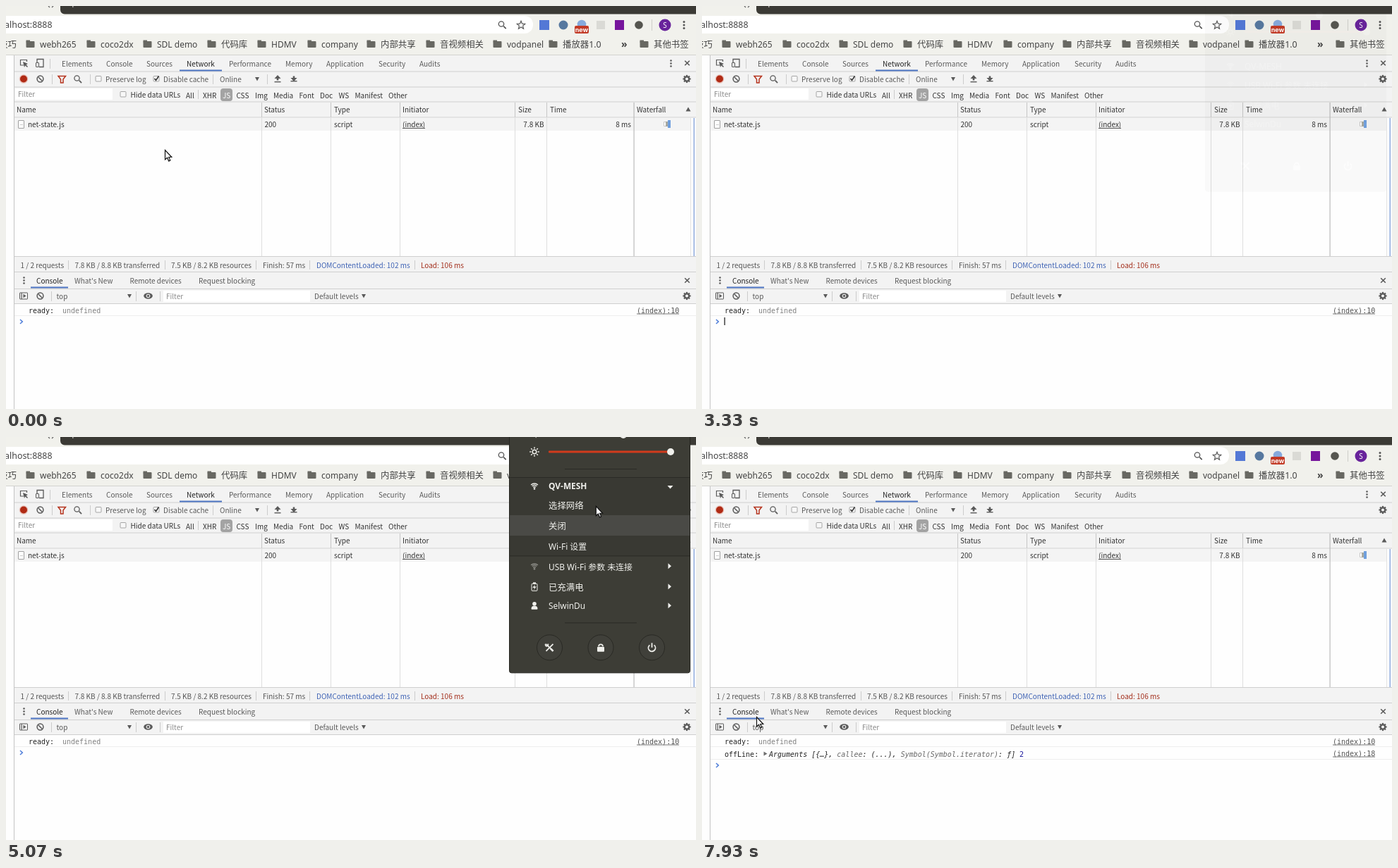
An HTML page with a canvas for the animation above (8000 ms loop, 978 by 572 pixels).

```html
<!DOCTYPE html>
<html lang="en">
<head>
<meta charset="utf-8">
<title>Network panel</title>
<style>
html, body { margin: 0; width: 100%; height: 100%; overflow: hidden; background: #fff; }
canvas { display: block; }
</style>
</head>
<body>
<canvas id="stage" width="978" height="572"></canvas>
<script>
const W = 978, H = 572, LOOP = 8000, TAU = Math.PI * 2;
const CJK = '"Noto Sans CJK SC", "Noto Sans CJK JP", "Noto Sans CJK"';
const UI = `10px ${CJK}, sans-serif`;
const SYS = `"Noto Sans", ${CJK}, sans-serif`;
const MONO = '10px "DejaVu Sans Mono", monospace';
const INK = '#5a5a5a';

const screen = document.getElementById('stage').getContext('2d');
const layer = document.createElement('canvas');
layer.width = W;
layer.height = H;
const overlay = layer.getContext('2d');
let g = screen;

const clamp = (v) => Math.max(0, Math.min(1, v));

function rect(x, y, w, h, color) {
  g.fillStyle = color;
  g.fillRect(x, y, w, h);
}
function text(s, x, y, color = '#333', font = UI, align = 'left') {
  g.font = font;
  g.fillStyle = color;
  g.textAlign = align;
  g.fillText(s, x, y);
}
function path(points, close) {
  g.beginPath();
  points.forEach(([x, y]) => g.lineTo(x, y));
  if (close) g.closePath();
}
function poly(color, ...points) {
  path(points, true);
  g.fillStyle = color;
  g.fill();
}
function line(color, width, ...points) {
  path(points);
  g.strokeStyle = color;
  g.lineWidth = width;
  g.stroke();
}
function disc(x, y, r, color) {
  g.beginPath();
  g.arc(x, y, r, 0, TAU);
  g.fillStyle = color;
  g.fill();
}
function arc(x, y, r, color, width = 1.2, from = 0, to = TAU) {
  g.beginPath();
  g.arc(x, y, r, from, to);
  g.strokeStyle = color;
  g.lineWidth = width;
  g.stroke();
}
function round(x, y, w, h, r, color) {
  g.beginPath();
  g.roundRect(x, y, w, h, r);
  g.fillStyle = color;
  g.fill();
}
function box(x, y, w, h, r, fill, stroke) {
  round(x, y, w, h, r, fill);
  g.strokeStyle = stroke;
  g.lineWidth = 1;
  g.stroke();
}
const dots = (x, y, gap, r, color) => [-1, 0, 1].forEach((i) => disc(x, y + i * gap, r, color));
const down = (x, y, color = INK) => poly(color, [x - 3, y - 2.5], [x + 3, y - 2.5], [x, y + 3]);

function cross(x, y, r, color, width = 1.6) {
  line(color, width, [x - r, y - r], [x + r, y + r]);
  line(color, width, [x + r, y - r], [x - r, y + r]);
}
function lens(x, y, r, color) {
  arc(x - 1, y - 1, r, color, 1.3);
  line(color, 1.7, [x + r * 0.6, y + r * 0.6], [x + r + 2, y + r + 2]);
}
function gear(x, y) {
  for (let i = 0; i < 8; i++) {
    const a = i * TAU / 8, c = Math.cos(a), s = Math.sin(a);
    line(INK, 2.2, [x + c * 3.4, y + s * 3.4], [x + c * 5.6, y + s * 5.6]);
  }
  arc(x, y, 3.2, INK, 2.3);
}
function blocked(x, y) {
  arc(x, y, 4.4, INK, 1.5);
  line(INK, 1.5, [x - 3, y - 3], [x + 3, y + 3]);
}
function folder(x) {
  round(x, 50, 12, 9, 1, '#686862');
  rect(x, 48.5, 5.5, 3, '#686862');
}
function arrowLoad(x, y, dir) {
  poly(INK, [x, y - 5 * dir], [x - 4.5, y], [x + 4.5, y]);
  rect(x - 1.3, dir > 0 ? y - 1 : y - 2.5, 2.6, 3.5, INK);
  rect(x - 4.5, y + 4, 9, 1.4, INK);
}
function link(s, y) {
  text(s, 894, y, '#545454', MONO);
  rect(894, y + 1, 60, 1, '#777');
}

function drawBrowser() {
  rect(0, 0, W, 70, '#f1f1ec');
  round(77, -10, 920, 21.5, 6, '#3b3a35');
  line('#666', 1.2, [60, 0], [62, 2]);
  line('#666', 1.2, [67, 0], [65, 2]);
  rect(94, 0, 1.5, 2, '#aaa9a4');
  round(-20, 14, 767, 25, 12, '#fff');
  text('localhost:8888', 65.5, 31, '#444', `12.4px ${SYS}`, 'right');
  lens(703, 26.5, 3.7, '#555');
  g.beginPath();
  for (let i = 0; i < 10; i++) {
    const a = i * TAU / 10 - TAU / 4, r = i % 2 ? 2.7 : 6;
    g.lineTo(730 + Math.cos(a) * r, 27.3 + Math.sin(a) * r);
  }
  g.closePath();
  g.strokeStyle = '#555';
  g.lineWidth = 1.2;
  g.stroke();

  rect(756, 20, 14, 14, '#5378d6');
  disc(790, 27, 6.5, '#56789f');
  disc(816, 26, 6.3, '#86a9dc');
  round(806, 28, 20, 11, 2, '#c23a26');
  text('new', 816, 36.5, '#fff', 'bold 9px Inter, sans-serif', 'center');
  rect(837, 21, 12, 12, '#dadad5');
  rect(863, 20, 13, 14, '#76159c');
  disc(897, 27, 5.8, '#55554f');
  rect(915, 19, 1, 16, '#cfcfca');
  disc(934, 27, 8.5, '#68239b');
  text('S', 934, 30.5, '#fff', `10px ${SYS}`, 'center');
  dots(961, 27, 4.6, 1.5, '#555');

  text('技巧', 15, 58.5, '#444', `12.4px ${SYS}`, 'right');
  const marks = [
    [28, 'webh265'], [114, 'coco2dx'], [194, 'SDL demo'], [285, '代码库'], [356, 'HDMV'],
    [427, 'company'], [511, '内部共享'], [595, '音视频相关'], [690, 'vodpanel'],
    [769, '播放器1.0'], [898, '其他书签']
  ];
  for (const [x, s] of marks) {
    folder(x + 0.5);
    text(s, x + 20, 58.5, '#444', `${s.charCodeAt(0) > 255 ? 12.4 : 12}px ${SYS}`);
  }
  text('»', 872, 58.5, '#444', `bold 14px ${SYS}`);
}

function drawNetwork() {
  rect(0, 69, W, 1, '#d2d2ce');
  rect(0, 70, W, H - 70, '#fefefe');
  rect(12, 70, W - 12, 88, '#f3f3f3');
  rect(11, 70, 1, H - 70, '#c4c4c4');
  for (const y of [93, 115, 136, 158]) rect(12, y - 0.5, W - 12, 1, '#cfcfcf');

  line(INK, 1.2, [25, 84], [20.5, 84], [20.5, 76.5], [29.5, 76.5], [29.5, 79]);
  poly(INK, [24, 79], [31, 82], [28.5, 83.3], [31, 86], [30, 87], [27.3, 84.5], [26, 87]);
  line(INK, 1.3, [44, 80], [44, 75.5], [53, 75.5], [53, 86.5], [47, 86.5]);
  box(42.5, 80.5, 4, 6, 0.5, '#f3f3f3', INK);
  rect(62, 75, 1, 14, '#ccc');
  const tabs = [[79, 'Elements'], [142, 'Console'], [199, 'Sources'], [256, 'Network'], [316, 'Performance'],
    [396, 'Memory'], [454, 'Application'], [528, 'Security'], [586, 'Audits']];
  for (const [x, s] of tabs) text(s, x, 86, s === 'Network' ? '#222' : INK);
  rect(246, 90.5, 60, 2, '#4a72c0');
  dots(942.5, 81.5, 4, 1.3, INK);
  cross(965.5, 81, 3.3, INK);

  disc(25, 103.5, 6.3, '#e9c0b8');
  disc(25, 103.5, 5, '#b02a14');
  blocked(48.5, 103.5);
  for (const x of [65, 119, 293, 370]) rect(x, 97, 1, 14, '#ccc');
  path([[74, 99.5], [84.5, 99.5], [81, 104], [81, 109], [77.5, 109], [77.5, 104]], true);
  g.strokeStyle = '#b5321c';
  g.lineWidth = 1.5;
  g.stroke();
  lens(101.5, 103.5, 3.6, INK);
  for (const [x, y] of [[127, 99.5], [209, 99.5], [162, 121.5]]) box(x, y, 8, 7.5, 1, '#f8f8f8', '#a5a5a5');
  line('#333', 1.6, [210.5, 103], [212.5, 105.5], [216.5, 99.5]);
  text('Preserve log', 141, 107.5, INK);
  text('Disable cache', 223, 107.5, INK);
  text('Online', 303, 107.5, INK);
  down(356, 103.5);
  arrowLoad(385, 103, 1);
  arrowLoad(408, 102, -1);
  gear(965, 103.5);

  rect(13, 117, 138, 16, '#fff');
  text('Filter', 17, 129, '#8a8a8a');
  text('Hide data URLs', 176.5, 130);
  rect(272, 119, 1, 13, '#ccc');
  round(304, 117, 17, 18, 4, '#a3a3a3');
  const kinds = [[255, 'All'], [279, 'XHR'], [307, 'JS'], [326.5, 'CSS'], [353, 'Img'], [379, 'Media'],
    [415.5, 'Font'], [445, 'Doc'], [471.5, 'WS'], [494.5, 'Manifest'], [542, 'Other']];
  for (const [x, s] of kinds) text(s, x, 130.5, s === 'JS' ? '#fff' : '#333');

  rect(12, 159, 958, 18, '#f4f4f4');
  for (const x of [362, 460, 558, 721, 766]) {
    rect(x, 137, 1, 21, '#c6c6c6');
    rect(x, 159, 1, 196, '#dedede');
  }
  rect(889.5, 137, 1.2, 218, '#bbb');
  rect(970, 159, 1, 196, '#e2e2e2');
  rect(974.5, 159, 1.5, 196, '#8fabdd');
  const heads = [[15, 'Name'], [366, 'Status'], [465, 'Type'], [562, 'Initiator'], [726, 'Size'], [771, 'Time'], [894, 'Waterfall']];
  for (const [x, s] of heads) text(s, x, 151);
  poly(INK, [963.5, 149.5], [970.5, 149.5], [967, 143.5]);

  box(17.5, 162.5, 8, 11, 0.5, '#fff', '#a0a0a0');
  line('#ccc', 1, [20, 168.5], [24, 168.5]);
  const cells = [[31, 'net-state.js'], [366.5, '200'], [465, 'script'], [562, '(index)']];
  for (const [x, s] of cells) text(s, x, 171.5);
  rect(562, 173, 32, 1, '#555');
  text('7.8 KB', 762.5, 171.5, '#333', UI, 'right');
  text('8 ms', 886, 171.5, '#333', UI, 'right');
  box(932.5, 164.5, 4, 6, 0, '#fff', '#c8c8c8');
  rect(935, 164, 3, 7, '#a9a9a0');
  rect(938, 162, 4, 11, '#6f9fdd');

  rect(12, 355, W - 12, 67, '#f3f3f3');
  for (const y of [355, 377, 401, 422]) rect(12, y, W - 12, 1, '#cfcfcf');
  const stats = [[20.5, '1 / 2 requests'], [97.5, '7.8 KB / 8.8 KB transferred'], [234, '7.5 KB / 8.2 KB resources'],
    [364, 'Finish: 57 ms'], [440, 'DOMContentLoaded: 102 ms', '#3f63b5'], [588, 'Load: 106 ms', '#a32f1c']];
  for (const [x, s, color] of stats) text(s, x, 371.5, color || '#555');
  for (const x of [88, 225, 354, 430, 579]) rect(x, 361, 1, 13, '#ccc');
}

function drawConsole(t) {
  const offline = t >= 5900;
  dots(25.5, 389.5, 4, 1.3, INK);
  const tabs = [[43, 'Console'], [97, "What's New"], [175.5, 'Remote devices'], [273, 'Request blocking']];
  tabs.forEach(([x, s], i) => text(s, x, 394, i ? INK : '#222'));
  rect(35, 398.5, 53, 2, '#4a72c0');
  cross(965.5, 389.5, 3.3, INK);

  box(19.5, 407, 11, 9, 0.5, '#f3f3f3', INK);
  rect(21.5, 407, 1.2, 9, INK);
  poly(INK, [24.5, 408.8], [28.5, 411.5], [24.5, 414.2]);
  blocked(48.5, 411.5);
  for (const x of [64, 184, 218]) rect(x, 405, 1, 14, '#ccc');
  text('top', 71.5, 416, INK);
  down(175, 411.5);
  g.beginPath();
  g.ellipse(201.5, 411.5, 6.3, 4.2, 0, 0, TAU);
  g.fillStyle = INK;
  g.fill();
  disc(201.5, 411.5, 2.8, '#f3f3f3');
  disc(201.5, 411.5, 1.7, INK);
  rect(223, 404, 208, 16, '#fff');
  text('Filter', 227, 416, '#8a8a8a');
  text('Default levels', 437, 416, INK);
  down(507, 411.5);
  gear(965, 411.5);

  text('ready:', 32, 435.5, '#222', MONO);
  text('undefined', 80, 435.5, '#808080', MONO);
  link('(index):10', 435.5);
  rect(12, 439, W - 12, 1, '#eee');
  if (offline) {
    text('offLine:', 32, 453.5, '#222', MONO);
    poly('#6e6e6e', [87.5, 446.5], [92.5, 449.5], [87.5, 452.5]);
    const parts = [['Arguments [{…}, ', '#222'], ['callee', '#666'], [': (...), ', '#222'],
      ['Symbol(Symbol.iterator)', '#666'], [': ƒ]', '#222']];
    let x = 95;
    for (const [s, color] of parts) {
      text(s, x, 453.5, color, 'italic ' + MONO);
      x += g.measureText(s).width;
    }
    text('2', 450, 453.5, '#1c1a9c', MONO);
    link('(index):18', 452.5);
    rect(12, 457, W - 12, 1, '#eee');
  }
  const y = offline ? 466 : 448;
  line('#4a7ad8', 1.5, [20, y - 3], [23.3, y], [20, y + 3]);
  if (t >= 1070 && Math.floor((t - 2070) / 530) % 2 === 0) rect(31.5, y - 6, 1.2, 11, '#111');
}

const PALE = '#f0f0ec';

function wifi(x, y, color) {
  [2.6, 5, 7.4].forEach((r) => arc(x, y + 4, r, color, 1.5, -TAU * 0.365, -TAU * 0.135));
  disc(x, y + 4, 1.3, color);
}
function sun(x, y) {
  arc(x, y, 2.8, PALE, 1.5);
  for (let i = 0; i < 8; i++) {
    const c = Math.cos(i * TAU / 8), s = Math.sin(i * TAU / 8);
    line(PALE, 1.5, [x + c * 4.6, y + s * 4.6], [x + c * 6.8, y + s * 6.8]);
  }
}
function battery(x, y) {
  box(x - 4, y - 4.5, 8, 10, 1, 'transparent', PALE);
  rect(x - 2, y - 6.5, 4, 2, PALE);
  poly(PALE, [x + 1, y - 3.5], [x - 2.7, y + 1.3], [x, y + 1.3], [x - 1, y + 4.5], [x + 2.7, y - 0.5], [x, y - 0.5]);
}
function person(x, y) {
  disc(x, y - 2.5, 2.8, PALE);
  round(x - 4.5, y + 0.5, 9, 5, [4, 4, 1, 1], PALE);
}
function plane(x, y) {
  poly(PALE, [x + 6, y], [x + 4, y - 1.2], [x + 1, y - 1.2], [x - 2, y - 6], [x - 3, y - 6], [x - 1.5, y - 1.2],
    [x - 4, y - 1], [x - 6, y - 3], [x - 5, y], [x - 6, y + 3], [x - 4, y + 1], [x - 1.5, y + 1.2],
    [x - 3, y + 6], [x - 2, y + 6], [x + 1, y + 1.2], [x + 4, y + 1.2]);
}
function tools(x, y) {
  cross(x, y, 5, PALE, 1.7);
  arc(x - 4, y - 4, 2, PALE, 1.6, -0.6, Math.PI + 0.6);
  line(PALE, 2.6, [x + 1.5, y + 1.5], [x + 5, y + 5]);
}
const more = (y) => poly(PALE, [938.5, y - 4], [943, y], [938.5, y + 4]);
const label = (s, y, bold = '') => text(s, 769, y + 4.5, PALE, `${bold} ${/^[\u4e00-\u9fff]/.test(s) ? 12.4 : 11.9}px ${SYS}`);
const rule = (y) => rect(792, y, 102, 1, '#2a2a25');

function slider(y, x) {
  rect(769, y - 1, 177, 2, '#2b2b26');
  round(769, y - 1.4, x - 769, 2.8, 1, '#d23b1c');
  disc(x, y, 5, PALE);
}

// System menu: fades and slides in, unfolds its Wi-Fi section, fades out
function drawMenu(t) {
  const alpha = t < 5000 ? clamp((t - 3328) / 140) : 1 - clamp((t - 5910) / 140);
  if (!alpha) return;
  const closing = t >= 5900;
  const slide = 16 * (1 - alpha);
  const unfold = clamp((t - 4440) / 260);
  const sub = 87.3 * (1 - (1 - unfold) ** 2);
  const air = closing ? 29 : 0;

  g = overlay;
  g.clearRect(0, 0, W, H);
  box(713.5, -20, 256, 267.5 + sub + air + slide, 3, '#3d3d36', '#262621');

  const head = slide - (closing ? 4 : 0);
  if (t >= 3650 && t < 4080) rect(714, 9, 255, 24.5, '#4a4a45');
  line(PALE, 1.2, [744, head - 4], [747, head - 4], [751, head], [751, head - 8]);
  slider(head - 3, 875);
  sun(749, 21 + head);
  slider(21 + head, 942);
  rule(45 + head);

  g.save();
  g.translate(0, slide);
  const name = closing ? 'PCI Wi-Fi 参数 已关闭' : 'QV-MESH';
  if (sub) {
    rect(714, 57, 255, 25 + sub, '#393933');
    rect(714, 57, 255, 1, '#2a2a25');
    rect(714, 81 + sub, 255, 1, '#2a2a25');
  }
  if (t >= 4150 && t < 4700) rect(714, 58, 255, 24, '#4a4a45');
  const nameY = closing ? 68.5 : 69.5;
  wifi(749, nameY, closing ? '#8b8b85' : PALE);
  label(name, nameY, sub ? 'bold' : '');
  if (!closing) {
    if (sub) poly(PALE, [937.5, 69], [945.5, 69], [941.5, 73.5]);
    else more(69);
  }
  if (sub) {
    g.save();
    g.beginPath();
    g.rect(714, 82, 255, sub);
    g.clip();
    if (t >= 4700 && t < 5050) rect(714, 82, 255, 29, '#4a4a46');
    if (t >= 5050 && t < 5720) rect(714, 111, 255, 29, '#4a4a46');
    ['选择网络', closing ? '开启' : '关闭', 'Wi-Fi 设置'].forEach((s, i) => label(s, 97 + i * 29));
    g.restore();
  }

  g.translate(0, sub);
  wifi(749, 96, '#8b8b85');
  label(closing ? 'USB Wi-Fi 参数 已关闭' : 'USB Wi-Fi 参数 未连接', 97);
  more(96);
  if (air) {
    plane(749, 125);
    label('飞行模式已开启', 126);
    more(125);
    g.translate(0, air);
  }
  battery(749, 125.5);
  label('已充满电', 126);
  more(125);
  person(749, 152);
  label('SelwinDu', 152);
  more(152);
  rule(176);
  for (const x of [770.5, 843, 915.5]) {
    disc(x, 211.5, 18, '#40403a');
    arc(x, 211.5, 18, '#292924', 1);
  }
  tools(770.5, 211.5);
  round(838, 210.5, 10, 7, 1, PALE);
  arc(843, 210, 3, PALE, 1.7, Math.PI, TAU);
  arc(915.5, 212, 5, PALE, 1.8, -0.9, Math.PI + 0.9);
  line(PALE, 1.8, [915.5, 205], [915.5, 211.5]);
  g.restore();

  g = screen;
  g.globalAlpha = alpha;
  g.drawImage(layer, 0, 0);
  g.globalAlpha = 1;
}

// Pointer path: time, x, y
const TRACK = [
  [0, 225, 204], [60, 225, 204], [200, 300, 240], [330, 332, 290], [470, 240, 360], [600, 120, 420], [730, 68, 436],
  [800, 94, 436], [930, 124, 436], [1130, 118, 436], [1330, 118, 442], [1470, 220, 410], [1600, 363, 331],
  [1660, 560, 190], [1725, 740, -25], [3600, 885, -25], [3730, 880, 4], [3930, 868, 22], [4200, 852, 66],
  [4470, 846, 70], [4930, 838, 92], [5070, 836, 97], [5130, 824, 142], [5270, 815, 123], [5330, 811, 134],
  [6200, 811, 134], [6330, 770, 146], [6600, 479, 232], [6860, 479, 232], [7000, 300, 360], [7130, 130, 460],
  [7270, 30, 492], [7350, 2, 470], [7470, 24, 446], [7600, 120, 432], [7670, 177, 438], [7800, 130, 424], [7930, 77, 397], [8000, 77, 397]
];

function drawPointer(t) {
  const i = TRACK.findIndex((k) => k[0] > t);
  const [t0, x0, y0] = TRACK[i - 1], [t1, x1, y1] = TRACK[i];
  const p = (t - t0) / (t1 - t0);
  g.save();
  g.translate(x0 + (x1 - x0) * p + 0.5, y0 + (y1 - y0) * p + 0.5);
  path([[0, 0], [0, 13.5], [3, 10.8], [5.2, 15.6], [7.3, 14.6], [5.2, 10], [9.3, 10]], true);
  g.fillStyle = '#fff';
  g.fill();
  g.strokeStyle = '#111';
  g.lineWidth = 1.2;
  g.stroke();
  g.restore();
}

function frame(now) {
  const t = now % LOOP;
  g = screen;
  drawBrowser();
  drawNetwork();
  drawConsole(t);
  drawMenu(t);
  drawPointer(t);
  requestAnimationFrame(frame);
}
requestAnimationFrame(frame);
</script>
</body>
</html>
```
